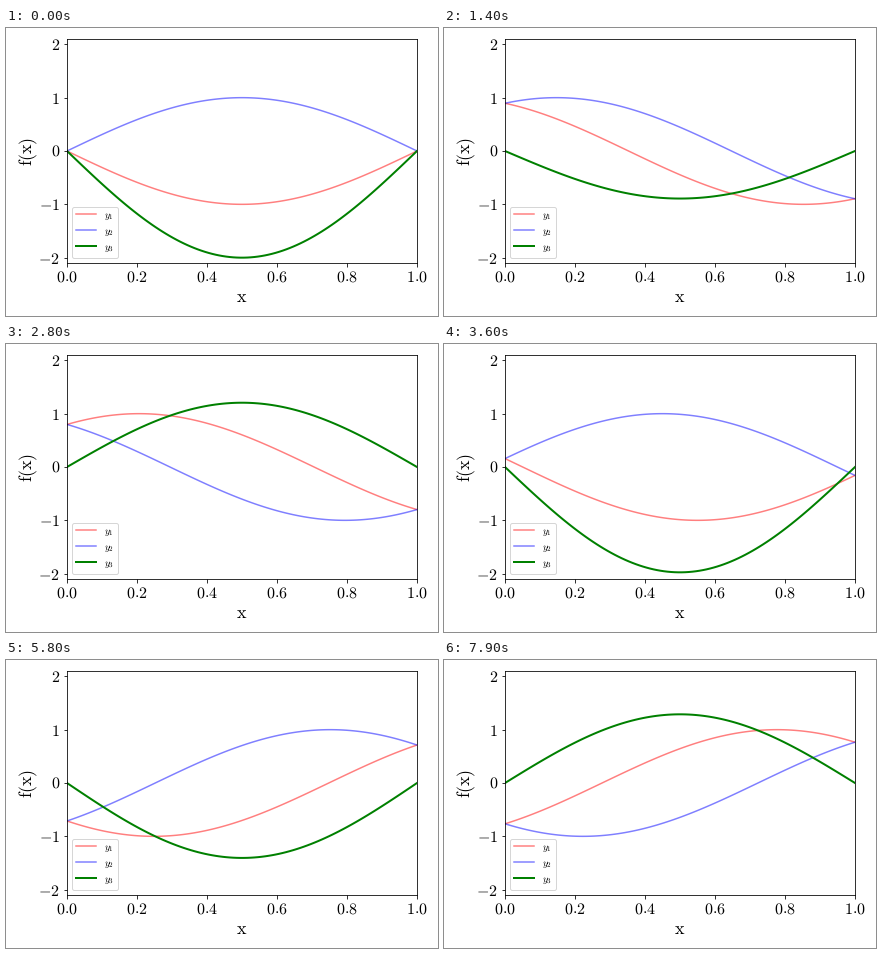
Recreate the animation shown at these times as a matplotlib script. Size 432 by 288 pixels, loop 8 s.

```python
import numpy as np
import matplotlib.pyplot as plt
from matplotlib.animation import FuncAnimation

plt.rcParams["mathtext.fontset"] = "cm"
plt.rcParams["text.hinting"] = "none"

W, H, DPI = 432, 288, 72
FRAMES, INTERVAL = 80, 100
OMEGA = 2 * np.pi / 11.9  # phase advance per frame

fig = plt.figure(figsize=(W / DPI, H / DPI), dpi=DPI)
ax = fig.add_axes([61 / W, 1 - 235 / H, 350 / W, 224 / H])
ax.set_xlim(0, 1)
ax.set_ylim(-2.1, 2.1)

xticks = np.linspace(0, 1, 6)
yticks = range(-2, 3)
ax.set_xticks(xticks, [f"${v:.1f}$" for v in xticks], fontsize=16)
ax.set_yticks(yticks, [f"${v}$" for v in yticks], fontsize=16)
ax.set_xlabel(r"$\mathrm{x}$", fontsize=18, labelpad=3)
ax.set_ylabel(r"$\mathrm{f(x)}$", fontsize=18, labelpad=-1)

x = np.linspace(0, 1, 100)
right, = ax.plot([], [], color="red", alpha=0.5, lw=1.5, label="$y_1$")
left, = ax.plot([], [], color="blue", alpha=0.5, lw=1.5, label="$y_2$")
standing, = ax.plot([], [], color="green", lw=2, label="$y_3$")
ax.legend(loc="lower left", prop={"family": "Liberation Serif", "size": 10})


def update(frame):
    phase = OMEGA * frame
    y1 = -np.sin(np.pi * x - phase)
    y2 = np.sin(np.pi * x + phase)
    right.set_data(x, y1)
    left.set_data(x, y2)
    standing.set_data(x, y1 - y2)
    return right, left, standing


anim = FuncAnimation(fig, update, frames=FRAMES, interval=INTERVAL,
                     repeat=True, repeat_delay=0)
plt.show()
```
